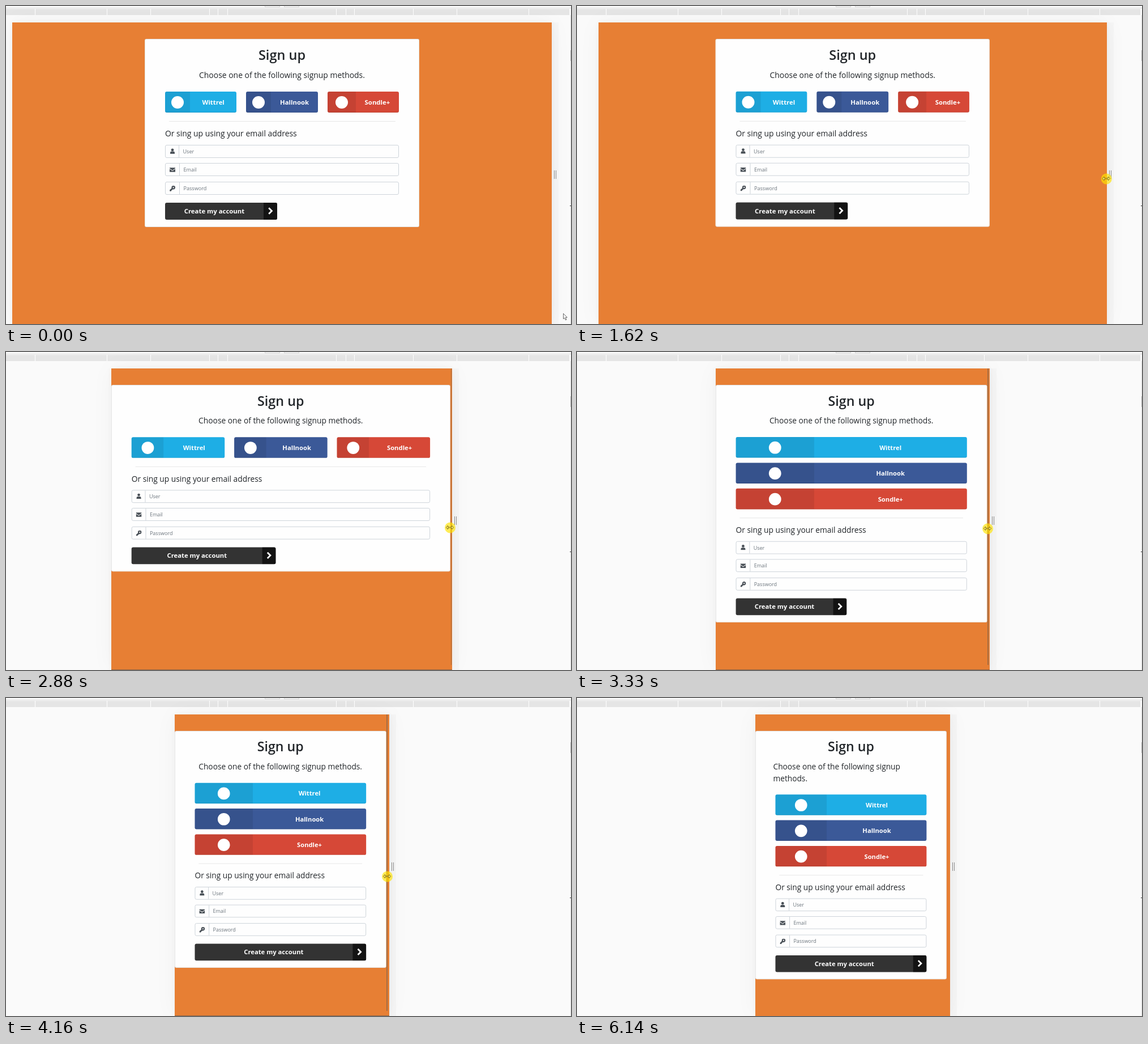
These frames come from a looping animation (998x561 px, 6.23 s). An HTML page:

```html
<!DOCTYPE html>
<html lang="en">
<head>
<meta charset="utf-8">
<title>Responsive sign up form</title>
<style>
* { box-sizing: border-box; }
html, body { margin: 0; width: 100%; height: 100%; overflow: hidden; }
body { position: relative; background: #fafafa; color: #212529; font-family: "Open Sans", "Noto Sans", sans-serif; }
body > *, .tick { position: absolute; }

#toolbar { left: 0; top: 0; width: 998px; height: 4px; background: #fbfbfb; border-bottom: 1px solid #dcdcdc; }
#toolbar i { position: absolute; top: 0; width: 27px; height: 2px; background: #fff; border: solid #d2d2d2; border-width: 0 1px 1px; }
#ruler { left: 0; top: 5px; width: 995px; height: 11px; background: #e5e5e5; }
.tick { top: 0; width: 1px; height: 11px; background: #fff; }
#edge { left: 997px; top: 16px; width: 1px; height: 545px; background: #e2e2e2; }
#edge i { position: absolute; right: 0; top: 62px; width: 1px; height: 19px; background: #aaa; }
#edge i + i { top: 336px; width: 2px; height: 1px; background: #333; }

#page { top: 29px; height: 532px; background: #e77f34; box-shadow: 0 0 40px rgba(0,0,0,.04), 0 0 10px rgba(0,0,0,.03); }
#bar { position: absolute; top: 0; width: 1.6px; height: 523px; background: rgba(110,95,80,.55); }
#base { position: absolute; left: 0; bottom: 0; height: 1px; width: 100%; background: rgba(95,85,75,.6); }
#strip { top: 29px; width: 11.5px; height: 532px; background: #000; }
#grip { top: 290px; width: 4px; height: 15px; border: solid #8a8a8a; border-width: 0 1px; }

#card { left: 0; top: 58px; padding: 10px 36px 12.8px; background: #fefefe; border-radius: 3px; box-shadow: inset 0 0 0 .7px rgba(0,0,0,.14); transform-origin: 0 0; }
h1 { margin: 0 0 7px; font-size: 23.5px; line-height: 36px; font-weight: 600; text-align: center; }
.intro { display: flex; justify-content: center; margin: 0 -4px 19px; }
p { margin: 0; font-size: 13.92px; line-height: 21.2px; }

.social { display: flex; gap: 17.2px; }
.stack .social { flex-direction: column; gap: 9px; }
.btn { display: flex; flex: 1 1 0; height: 37px; border-radius: 3px; overflow: hidden; color: #fff; font-size: 11.35px; font-weight: 700; background: var(--c); box-shadow: inset 0 -1px rgba(0,0,0,.1); }
.stack .btn { flex: none; }
.btn span { display: flex; align-items: center; justify-content: center; }
.mark { flex: none; width: calc(33.33% + 2px); min-width: var(--min, 0); background: rgba(0,0,0,.08); }
.mark::before { content: ""; width: 22px; height: 22px; border-radius: 50%; background: #fff; }
.btn .label { flex: 1; }

hr { height: 1px; margin: 14.7px 6.5px 9.7px; border: 0; background: #e7e7e7; }
.field { display: flex; height: 23px; margin-top: 9.75px; border: 1px solid #ced4da; border-radius: 3px; font-size: 9.1px; line-height: 21px; color: #6c757d; }
.field span { width: 25px; border-right: 1px solid #ced4da; margin-right: 6.5px; display: flex; align-items: center; justify-content: center; }
.field.user span { width: 24px; }
.field svg { width: 10px; height: 10px; fill: #495057; }

.create { display: flex; width: calc(50% - 8.6px); height: 29.8px; margin-top: 14.2px; border-radius: 3px; overflow: hidden; background: #333; color: #fff; font-size: 11.4px; font-weight: 700; line-height: 29.8px; text-align: center; }
.small .create { width: 100%; }
.create b { flex: 1; }
.create span { width: 24px; background: #131313; }
.create svg { display: block; margin: 8px auto; width: 10px; height: 13px; fill: none; stroke: #fff; stroke-width: 2.8; }

.pointer { left: 0; top: 0; overflow: visible; }
#halo { left: -9.5px; top: -9.5px; position: absolute; width: 19px; height: 19px; border-radius: 50%; background: rgba(255,228,0,.66); }
#resize svg { position: absolute; left: -8px; top: -5px; }
</style>
</head>
<body>
<div id="toolbar"><i style="left:457px"></i><i style="left:491px"></i></div>
<div id="ruler"></div>
<div id="edge"><i></i><i></i></div>

<div id="strip"></div>
<div id="page"><div id="bar"></div><div id="base"></div></div>
<div id="grip"></div>

<div id="card">
  <h1>Sign up</h1>
  <div class="intro"><p>Choose one of the following signup methods.</p></div>
  <div class="social">
    <div class="btn" style="--c:#1eaee5"><span class="mark"></span><span class="label">Wittrel</span></div>
    <div class="btn" style="--c:#3b5998"><span class="mark"></span><span class="label">Hallnook</span></div>
    <div class="btn" style="--c:#d64837;--min:50px"><span class="mark"></span><span class="label">Sondle+</span></div>
  </div>
  <hr>
  <p>Or sing up using your email address</p>
  <div class="field user"><span><svg viewBox="0 0 10 10"><circle cx="5" cy="2.8" r="2.4"/><path d="M1 9.7V8Q1 5.6 3.2 5.6H6.8Q9 5.6 9 8V9.7Z"/></svg></span>User</div>
  <div class="field"><span><svg viewBox="0 0 10 10"><path d="M0 1.3H10V2.2L5 5.9 0 2.2ZM0 3.4 5 7 10 3.4V8.7H0Z"/></svg></span>Email</div>
  <div class="field"><span><svg viewBox="0 0 10 10"><circle cx="6.7" cy="3.3" r="2.2" fill="none" stroke="#495057" stroke-width="2.2"/><path d="M4 4 6 6 5 7.2H4V8.3H3V9.7H.2V7.6Z"/></svg></span>Password</div>
  <div class="create"><b>Create my account</b><span><svg viewBox="0 0 10 13"><path d="M2.2 1.3 7.4 6.5 2.2 11.7"/></svg></span></div>
</div>

<svg id="arrow" class="pointer" width="8" height="13" viewBox="0 0 8 13">
  <path d="M.5.5V10L2.7 8 4.3 12 6 11.3 4.4 7.4H7.2Z" fill="#fff" stroke="#444" stroke-width=".8"/>
</svg>
<div id="resize" class="pointer">
  <div id="halo"></div>
  <svg width="16" height="10" viewBox="0 0 16 10" fill="#ffe95a" stroke="#6d5c14" stroke-width=".8">
    <path d="M1 5 4.5 1.8V4H7V6H4.5V8.2ZM15 5 11.5 1.8V4H9V6H11.5V8.2Z"/>
  </svg>
</div>

<script>
const LOOP = 6230, STEP = 75, PHASE = 30;
const HOVER = 520, GRAB = 980, RELEASE = 5110, EXIT = 5590;
const CENTER = 487;
const $ = id => document.getElementById(id);

// the hand-dragged page edge: time, left side
const drag = [[GRAB, 11], [1560, 32], [2055, 102.5], [2880, 186.5], [3330, 245.5], [3480, 263], [4155, 298], [5020, 315.5]];

const ramp = (t, a, b) => Math.min(1, Math.max(0, (t - a) / (b - a)));
const mix = (a, b, k) => a + (b - a) * k;

function edgeAt(t) {
  let x = drag[0][1];
  for (let i = 1; i < drag.length; i++)
    x += (drag[i][1] - drag[i - 1][1]) * ramp(t, drag[i - 1][0], drag[i][0]);
  return x;
}

for (const d of [96, 113, 128, 232, 309, 436])
  for (const x of [CENTER - d, CENTER + d]) {
    const tick = document.createElement("div");
    tick.className = "tick";
    tick.style.left = x + "px";
    $("ruler").append(tick);
  }

function move(el, x, y, shown) {
  el.style.visibility = shown ? "visible" : "hidden";
  el.style.transform = `translate(${x}px, ${y}px)`;
}

function layout(t) {
  const edge = edgeAt(t);
  const left = Math.floor(edge), right = Math.round(974.6 - edge);
  const width = right - left;
  const shrink = (edge - 11) / 304;
  const zoom = 1 - .015 * shrink;
  const inner = width - 6 * shrink;

  $("page").style.left = left + "px";
  $("page").style.width = width + "px";
  $("bar").style.left = inner + 1 + "px";
  $("bar").style.display = $("base").style.display = left > 60 && t < RELEASE ? "block" : "none";
  $("strip").style.left = right + "px";
  $("strip").style.opacity = .02 + .12 * (ramp(t, 435, 690) - ramp(t, GRAB, 1240));
  $("grip").style.left = right + 4 + "px";

  const card = $("card");
  const cardWidth = width < 668 ? inner : 485 * zoom;
  card.className = (width < 517 ? "stack " : "") + (width < 388 ? "small" : "");
  card.style.width = cardWidth / zoom + "px";
  card.style.transform = `translateX(${left + (inner - cardWidth) / 2}px) scale(${zoom})`;
  return right;
}

function point(t, right) {
  const enter = ramp(t, 0, 370), leave = ramp(t, RELEASE, EXIT);
  if (t < HOVER) move($("arrow"), mix(984, 951, enter), mix(542, 291, enter), true);
  else move($("arrow"), mix(657, 985, leave), mix(317, 598, leave), t >= RELEASE && t < EXIT);

  const pull = ramp(t, GRAB, 2000);
  move($("resize"), right + 3 - 7 * pull, mix(302, 318, ramp(t, GRAB, 5020)), t >= HOVER && t < RELEASE);
  $("halo").style.display = t >= GRAB ? "block" : "none";
}

const start = performance.now();
function frame() {
  const t = (performance.now() - start) % LOOP;
  // the screen updates in steps
  const stepped = Math.max(0, Math.floor((t + 8 - PHASE) / STEP) * STEP + PHASE);
  const right = layout(stepped);
  point(t < STEP ? 0 : Math.max(stepped, t >= GRAB && t < GRAB + STEP ? GRAB : 0), right);
  requestAnimationFrame(frame);
}
frame();
</script>
</body>
</html>
```
